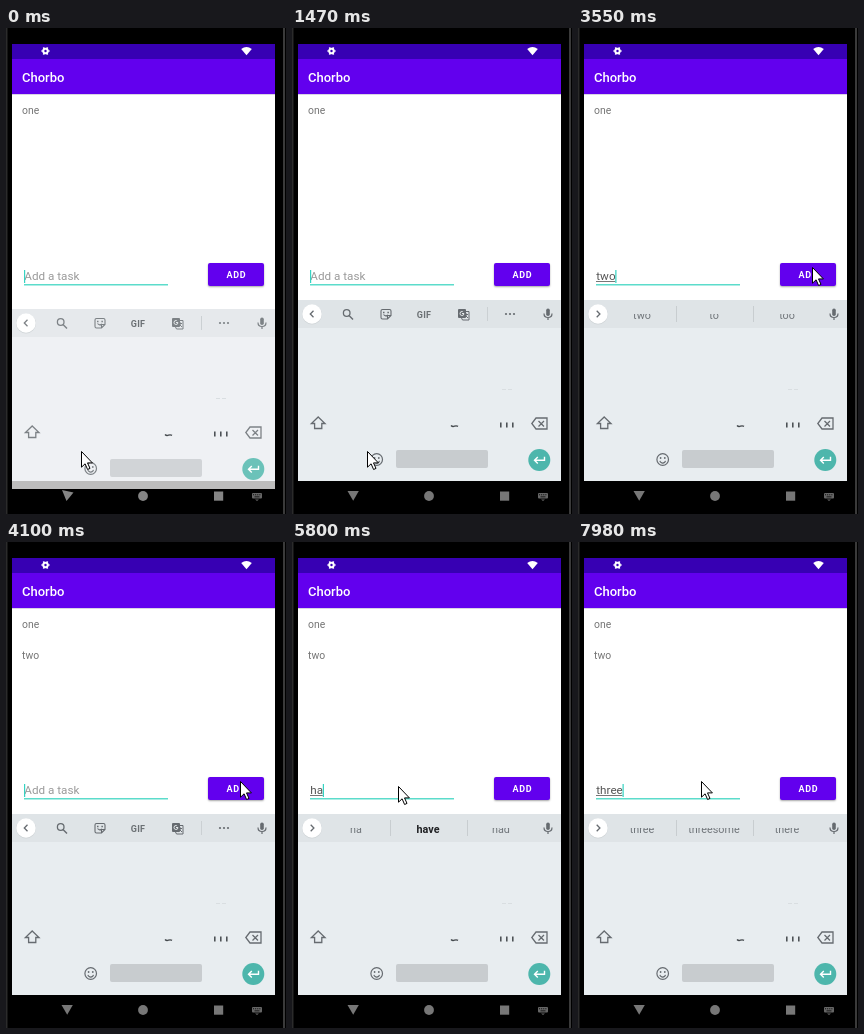
Animation, 280 px wide and 486 px high, one loop 8000 ms. Source, as an HTML page with a canvas:

```html
<!DOCTYPE html>
<html lang="en">
<head>
<meta charset="utf-8">
<title>Task list</title>
<style>
html, body { margin: 0; width: 100%; height: 100%; overflow: hidden; background: #000; }
canvas, svg { position: absolute; left: 0; top: 0; width: 280px; height: 486px; }
text { font-family: Roboto, "Liberation Sans", sans-serif; white-space: pre; }
.task { font-size: 10.4px; fill: #757575; }
.field { font-size: 11.7px; }
.sug { font-size: 10.8px; fill: #70757a; text-anchor: middle; }
.bold { font-weight: 700; fill: #202124; }
</style>
</head>
<body>
<canvas id="stage"></canvas>
<svg viewBox="0 0 280 486">
  <clipPath id="low"><rect x="36" y="286" width="204" height="14"/></clipPath>
  <text x="16" y="53.5" font-size="13" font-weight="500" fill="#fff">Chorbo</text>
  <text class="task" x="16" y="86">one</text>
  <text class="task" id="second" x="16" y="117">two</text>
  <text class="field" id="hint" x="18.3" y="251.5" fill="#9a9a9a">Add a task</text>
  <text class="field" id="typed" x="18.3" y="251.5" fill="#555"></text>
  <rect id="compose" x="18" y="253" height="1" fill="#777"/>
  <rect id="caret" y="242" width="1.2" height="13" fill="#35d3c2"/>
  <text x="230.4" y="250" font-size="9" font-weight="700" letter-spacing=".6" text-anchor="middle" fill="#fff">ADD</text>
  <text id="gif" x="132" y="289.5" font-size="9" font-weight="700" letter-spacing=".3" text-anchor="middle" fill="#6b7074">GIF</text>
  <g id="sugs">
    <g clip-path="url(#low)"><text class="sug" x="64" y="290.6"></text></g>
    <g id="midClip"><text class="sug" x="136" y="290.6"></text></g>
    <g clip-path="url(#low)"><text class="sug" x="209" y="290.6"></text></g>
  </g>
  <path id="pointer" d="M.5 .5V16.2L4.1 12.8L6.6 18.5L9 17.4L6.5 11.9H11.4Z" fill="#fff" stroke="#000"/>
</svg>
<script>
const LOOP = 8000;
const $ = id => document.getElementById(id);
const canvas = $('stage'), c = canvas.getContext('2d');
const dpr = window.devicePixelRatio || 1;
canvas.width = 280 * dpr;
canvas.height = 486 * dpr;
const sugTexts = [...document.querySelectorAll('.sug')];

// Each track lists [start time, value]; values hold until the next entry.
const typing = [[0, ''], [980, 't'], [1350, ''], [2280, 'tw'], [2430, 'two'], [3980, ''],
  [5680, 'h'], [5800, 'ha'], [6500, 'h'], [6620, ''], [7040, 't'], [7190, 'th'],
  [7310, 'thr'], [7430, 'thre'], [7550, 'three']];
const strip = [[0, ''], [980, 't'], [1470, ''], [2280, 'tw'], [2430, 'two'], [4100, ''],
  [5680, 'h'], [5800, 'ha'], [6500, 'h'], [6770, ''], [7040, 't'], [7190, 'th'],
  [7310, 'thr'], [7430, 'thre'], [7550, 'three']];
const caretOn = [[0, 1], [360, 0], [860, 1], [1750, 0], [2280, 1], [2980, 0], [3430, 1],
  [4490, 0], [4880, 1], [5400, 0], [5680, 1], [6360, 0], [6500, 1]];
const mouse = [[0, [75, 423]], [2830, [123, 369]], [2980, [166, 334]], [3130, [258, 253]],
  [3280, [268, 241]], [3430, [246, 239]], [3550, [234, 239]], [4240, [206, 240]],
  [4370, [160, 243]], [4490, [122, 244]], [4630, [106, 244]], [7980, [123, 239]]];
const guesses = {
  t: ['t', 'the', 'to'], tw: ['tw', 'two', 'twice'], two: ['two', 'to', 'too'],
  h: ['h', 'have', 'how'], ha: ['ha', 'have', 'had'], th: ['th', 'the', 'that'],
  thr: ['thr', 'three', 'through'], thre: ['thre', 'three', 'there'],
  three: ['three', 'threesome', 'there']
};

function at(track, t) {
  let v = track[0][1];
  for (const [start, value] of track) if (t >= start) v = value;
  return v;
}

function rect(x, y, w, h, color, r = 0) {
  c.fillStyle = color;
  c.beginPath();
  c.roundRect(x, y, w, h, r);
  c.fill();
}

function disc(x, y, r, color) {
  c.fillStyle = color;
  c.beginPath();
  c.arc(x, y, r, 0, 7);
  c.fill();
}

function ring(x, y, r, a = 0, b = Math.PI * 2) {
  c.beginPath();
  c.arc(x, y, r, a, b);
  c.stroke();
}

function shape(d, color) {
  c.fillStyle = color;
  c.fill(new Path2D(d));
}

function line(d, color, width = 1.2) {
  c.strokeStyle = color;
  c.lineWidth = width;
  c.stroke(new Path2D(d));
}

function statusBar() {
  rect(6, 16, 263, 15, '#3700b3');
  c.strokeStyle = '#fff';
  c.lineWidth = 2;
  ring(39.5, 23, 2.2);
  c.lineWidth = 1.6;
  for (let i = 0; i < 6; i++) {
    const a = i * Math.PI / 3, x = Math.cos(a), y = Math.sin(a);
    c.beginPath();
    c.moveTo(39.5 + x * 2.6, 23 + y * 2.6);
    c.lineTo(39.5 + x * 4.1, 23 + y * 4.1);
    c.stroke();
  }
  shape('M235.2 21Q240.5 16.8 245.8 21L240.5 27.2Z', '#fff');
}

function app(pressed) {
  rect(6, 31, 263, 36, '#6200ee');
  rect(6, 66, 263, 387, '#fff');
  rect(6, 66, 263, 1, '#d9d3e4');
  rect(18, 256, 144, 1.6, '#5cdccb');
  c.save();
  c.shadowColor = 'rgba(0,0,0,.35)';
  c.shadowBlur = 2 * dpr;
  c.shadowOffsetY = dpr;
  rect(202, 235, 56, 23, pressed ? '#7c32f1' : '#6200ee', 2);
  c.restore();
}

function toolbar(ink) {
  c.strokeStyle = ink;
  c.lineWidth = 1.3;
  ring(54.7, 285, 3.3);
  line('M57 287.5L61 291.5', ink, 1.5);
  line('M90.5 281.5H97.5Q99 281.5 99 283V287.5L95.5 291H90.5Q89 291 89 289.5V283Q89 281.5 90.5 281.5ZM99 287.5H95.5V291M91.5 286.5Q93.5 289 96 287', ink, 1.1);
  rect(91, 283.7, 1.5, 1.5, ink);
  rect(95.4, 283.7, 1.5, 1.5, ink);
  rect(166, 281, 8, 9, ink, 1);
  line('M174 283.5H177V292H170.5L169.5 290M172.5 286.5H176M174.5 285.5V286.5Q174 289 172 290M173.5 287.5L176 290', ink, 1);
  c.strokeStyle = '#e4e8ea';
  c.lineWidth = 1;
  ring(170, 285.5, 2, .1, 5.3);
  line('M170 285.5H172', '#e4e8ea', 1);
  rect(195, 279, 1, 14, '#cbd0d3');
  for (const x of [214, 218, 222]) disc(x, 286, 1.1, ink);
}

function keyboard(suggest, opening) {
  const ink = opening ? '#7d8286' : '#666b70';
  c.save();
  c.beginPath();
  c.rect(6, 272, 263, 181);
  c.clip();
  if (opening) c.translate(0, 9);
  rect(6, 272, 263, 181, opening ? '#eff1f4' : '#e8edf0');
  rect(6, 272, 263, 28, opening ? '#e6e9ec' : '#dfe4e7');
  disc(20, 286.5, 10, '#d0d5d8');
  disc(20, 286, 9.7, '#fff');
  line(suggest ? 'M18.7 282.8L21.9 286L18.7 289.2' : 'M21.5 282.8L18.3 286L21.5 289.2', ink, 1.3);
  if (suggest) {
    rect(98, 278, 1, 16, '#c8cdd0');
    rect(175, 278, 1, 16, '#c8cdd0');
  } else toolbar(ink);
  rect(254.2, 280.5, 3.6, 7.5, ink, 1.8);
  line('M252 285.5Q252 289.5 256 289.5Q260 289.5 260 285.5M256 289.5V292', ink);

  rect(210, 361, 4, 1, '#d9dee1');
  rect(216, 361, 4, 1, '#d9dee1');
  line('M26.2 389L33 395.5H29.8V400.5H22.6V395.5H19.4Z', ink, 1.3);
  line('M159 397.5Q160.5 399 162.5 398.2Q164.5 397.4 166 398.4', '#44494d', 1.4);
  for (const x of [208, 214, 220]) rect(x, 394.5, 1.6, 5, '#4d5256');
  line('M244 390H255V401H244L239.8 395.5ZM246.5 393L252 398.5M252 393L246.5 398.5', ink, 1.3);
  c.strokeStyle = ink;
  c.lineWidth = 1.2;
  ring(84.7, 431.5, 5.8);
  ring(84.7, 432, 3, .3, 2.84);
  disc(82.6, 430, .9, ink);
  disc(86.8, 430, .9, ink);
  rect(104, 422, 92, 18, opening ? '#d1d4d7' : '#c8cccf', 2);
  disc(247.3, 432, 11, opening ? '#6bc2b9' : '#4db6ac');
  line('M252.5 428.8V432.3H242.5M245.8 429L242.5 432.3L245.8 435.6', '#fff', 1.4);
  c.restore();
}

function navBar(opening) {
  const ink = opening ? '#858585' : '#777';
  if (opening) rect(6, 453, 263, 8, '#bdbdbd');
  shape(opening ? 'M56 462L67.5 464.5L60.5 473Z' : 'M55.5 463H66.8L61.2 472.8Z', ink);
  disc(137, 468, 4.9, ink);
  rect(208, 463.5, 9.2, 9.2, ink);
  rect(246, 465, 10, 5.5, '#666', 1);
  for (let i = 0; i < 4; i++) rect(247 + i * 2.1, 466.3, 1.1, 1, '#111');
  rect(248.5, 468.4, 5, .9, '#111');
  shape('M249 471.5H253L251 473Z', '#666');
}

function paint(t) {
  const text = at(typing, t), key = at(strip, t), opening = t < 120;
  c.setTransform(dpr, 0, 0, dpr, 0, 0);
  rect(0, 0, 280, 486, '#000');
  rect(0, 0, 1.5, 486, '#2b2b2b');
  rect(277, 0, 2, 486, '#3a3a3a');
  statusBar();
  app(t >= 3860 && t < 4100);
  keyboard(key, opening);
  navBar(opening);

  const show = (id, on) => $(id).setAttribute('visibility', on ? 'visible' : 'hidden');
  show('second', t >= 3980);
  show('hint', !text);
  show('caret', at(caretOn, t));
  show('gif', !key);
  $('gif').setAttribute('transform', `translate(0 ${opening ? 9 : 0})`);
  $('typed').textContent = text;
  const width = text ? $('typed').getComputedTextLength() : 0;
  $('compose').setAttribute('width', width);
  $('caret').setAttribute('x', 18 + width);

  const words = guesses[key] || ['', '', ''], bold = key === 'ha';
  sugTexts.forEach((el, i) => { el.textContent = words[i]; });
  sugTexts[1].classList.toggle('bold', bold);
  $('midClip').setAttribute('clip-path', bold ? 'none' : 'url(#low)');
  $('pointer').setAttribute('transform', `translate(${at(mouse, t)})`);
}

const start = performance.now();
function tick() {
  paint((performance.now() - start) % LOOP);
  requestAnimationFrame(tick);
}
tick();
</script>
</body>
</html>
```
